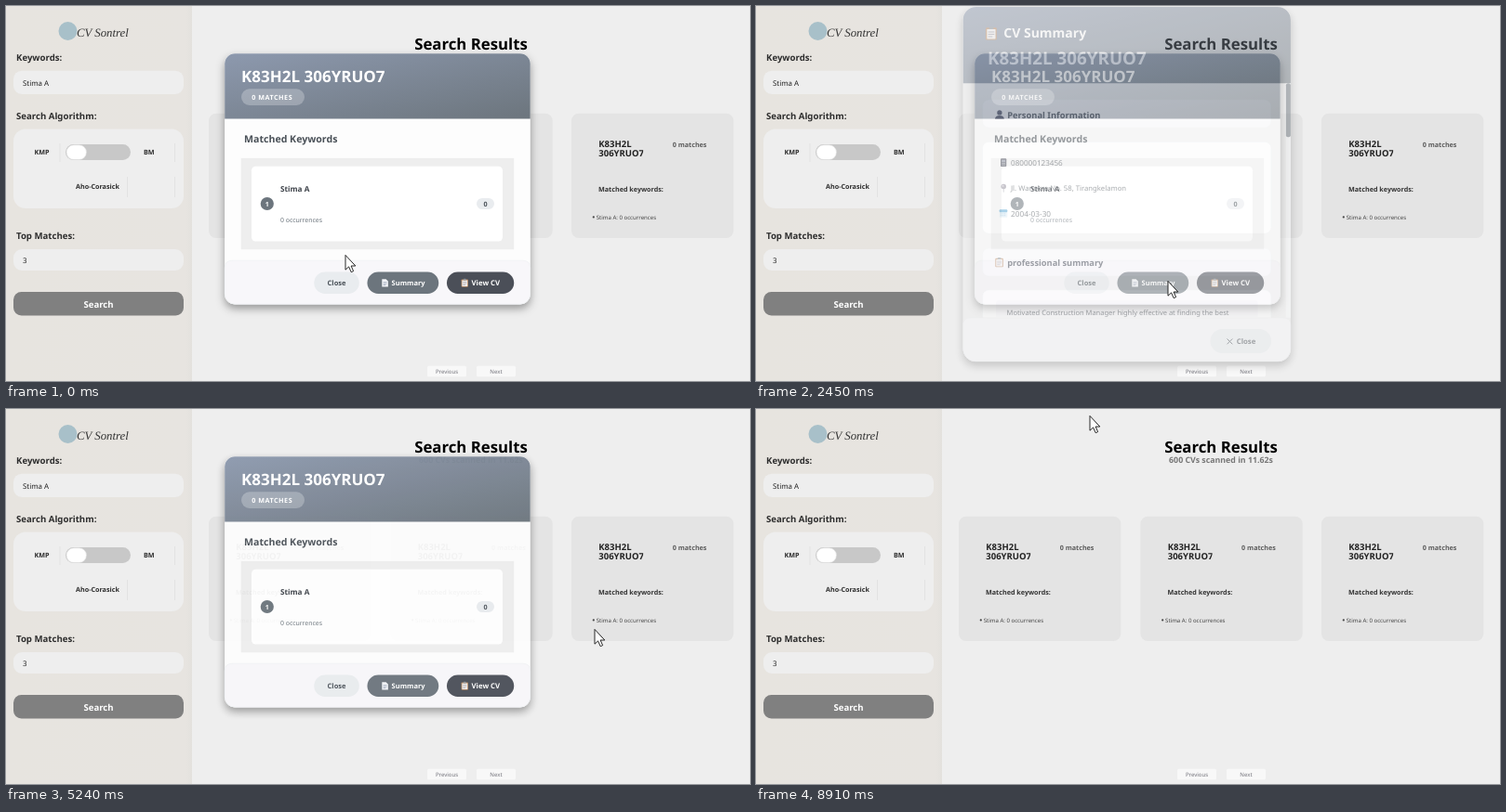
Recreate the animation shown at these times as an HTML page. Size 800 px wide and 404 px high, loop 8940 ms.

```html
<!DOCTYPE html>
<html lang="en">
<head>
<meta charset="utf-8">
<title>CV search</title>
<style>
  html, body { margin: 0; width: 100%; height: 100%; overflow: hidden; background: #eee; }
  svg { display: block; width: 800px; height: 404px; }
  text { font-family: "Noto Sans", "Open Sans", sans-serif; white-space: pre; text-rendering: geometricPrecision; }
</style>
</head>
<body>
<svg id="stage" viewBox="0 0 800 404" xmlns="http://www.w3.org/2000/svg"></svg>
<script>
const LOOP = 8940;
const NAME = ["K83H2L", "306YRUO7"];
const FULL_NAME = NAME.join(" ");
const CARD_X = [218, 413.4, 608];

const rect = (x, y, w, h, r, fill, extra = "") =>
  `<rect x="${x}" y="${y}" width="${w}" height="${h}" rx="${r}" fill="${fill}" ${extra}/>`;
const text = (x, y, size, fill, str, extra = "") =>
  `<text x="${x}" y="${y}" font-size="${size}" fill="${fill}" ${extra}>${str}</text>`;
const bold = (x, y, size, fill, str, extra = "") =>
  text(x, y, size, fill, str, `font-weight="700" ${extra}`);
const middle = 'text-anchor="middle"';
const path = (d, fill, extra = "") => `<path d="${d}" fill="${fill}" ${extra}/>`;
const at = (x, y, scale, content) =>
  `<g transform="translate(${x} ${y}) scale(${scale})">${content}</g>`;

// Icons on a grid of about 10 units
const clipboard =
  rect(0, 0.8, 9, 10, 1, "#b98a63") + rect(1, 2, 7, 8, 0.3, "#f4f0ee") +
  rect(2.7, 0, 3.6, 2, 0.6, "#8b9298") +
  path("M2 4.3H7M2 6.2H7M2 8.1H5.5", "none", 'stroke="#9a9aa5" stroke-width=".7"');
const page =
  path("M0 0H5.2L8 2.8V10H0Z", "#f3f5f8") +
  path("M1.6 4.2H6.3M1.6 6H6.3M1.6 7.8H5", "none", 'stroke="#8d99ae" stroke-width=".8"');
const person =
  `<circle cx="5" cy="3" r="2.7" fill="#3b3d55"/>` +
  path("M0 10Q0 6 5 6T10 10Z", "#3b3d55");
const phone =
  rect(0, 0, 6.4, 9, 1, "#3d4050") + rect(1.2, 1.4, 4, 2.6, 0.2, "#8d93a5") +
  path("M1.3 5.4H5.1M1.3 7H5.1", "none", 'stroke="#a9adba" stroke-width=".8"');
const pin =
  path("M3 4V9", "none", 'stroke="#a5a8b2" stroke-width=".9"') +
  `<circle cx="3" cy="2.8" r="2.8" fill="#8b8795"/><circle cx="2.3" cy="2" r=".9" fill="#d6d2da"/>`;
const calendar =
  rect(0, 0.5, 9, 9, 1, "#dcecf6") + rect(0, 0.5, 9, 3, 1, "#4a9fd0") +
  path("M1.6 5.3H7.5M1.6 7.3H7.5", "none", 'stroke="#7fb6d6" stroke-width=".9" stroke-dasharray="1.2 .8"');

function sidebar() {
  const ink = "#2d2d2d";
  const label = (y, str) => bold(11, y, 9.65, ink, str);
  return rect(0, 0, 200, 404, 0, "url(#side)") +
    `<circle cx="66.5" cy="27" r="10" fill="#a8c0c9"/>` +
    `<text x="76" y="33" font-size="12.8" font-style="italic" fill="#333" style="font-family:'Liberation Serif',serif">CV Sontrel</text>` +
    label(59.3, "Keywords:") + rect(8, 69.7, 183, 25.3, 9, "#eee") +
    text(18, 86, 7.9, "#222", "Stima A") +
    label(122.3, "Search Algorithm:") + rect(8, 132.5, 183, 85.5, 13, "#eee") +
    bold(30.5, 160, 7.2, ink, "KMP") + bold(148, 160, 7.2, ink, "BM") +
    bold(75, 196.7, 7.2, ink, "Aho-Corasick") +
    path("M58 148V168M181.5 148V168M130.5 184V206M181.5 184V206", "none", 'stroke="#e2e2e2"') +
    rect(64, 149, 70, 17, 8.5, "#c8c8c8") +
    rect(65, 149.7, 21.5, 15.8, 7.9, "#fff", 'stroke="#ddd" stroke-width=".6"') +
    label(251.2, "Top Matches:") + rect(8, 262, 183, 23, 9, "#eee") +
    text(18, 276.5, 7.9, "#222", "3") +
    rect(8, 308, 183, 25.6, 8.5, "#808080") +
    bold(99.5, 324.7, 9.6, "#fff", "Search", middle);
}

function card(x, i) {
  return `<g transform="translate(${x} 0)">` +
    rect(0, 115.7, 174.3, 134.3, 8, "#e4e4e4", `id="card${i}"`) +
    `<g clip-path="url(#nameClip)">` +
    bold(29.3, 151.7, 9.5, "#222", NAME[0]) + bold(29.3, 162.3, 9.5, "#222", NAME[1]) + "</g>" +
    bold(108.7, 151.6, 7.2, "#5c5c5c", "0 matches") +
    bold(29, 200.2, 7.2, "#333", "Matched keywords:") +
    `<circle cx="23.8" cy="227.4" r="1.1" fill="#444"/>` +
    text(26.7, 229.6, 6.07, "#444", "Stima A: 0 occurrences") + "</g>";
}

function results() {
  const pager = (x, str) => rect(x, 387.8, 42, 11.4, 1.5, "#f8f8f8") +
    text(x + 21, 395.8, 6.05, "#74747c", str, middle);
  return bold(500, 46.7, 16.8, "#000", "Search Results", middle) +
    bold(500, 58.3, 8.8, "#777", "600 CVs scanned in 11.62s", middle) +
    CARD_X.map(card).join("") + pager(453, "Previous") + pager(506, "Next");
}

// Rounded window: header gradient, body and footer
function shell(x, y, w, h, r, headH, footH, body) {
  const b = y + h, e = x + w;
  return rect(x, y, w, h, r, body, 'filter="url(#shadow)"') +
    path(`M${x} ${y + headH}V${y + r}a${r} ${r} 0 0 1 ${r} ${-r}H${e - r}a${r} ${r} 0 0 1 ${r} ${r}V${y + headH}Z`, "url(#head)") +
    path(`M${x} ${b - footH + 8}q0 -8 8 -8H${e - 8}q8 0 8 8V${b - r}a${r} ${r} 0 0 1 ${-r} ${r}H${x + r}a${r} ${r} 0 0 1 ${-r} ${-r}Z`,
      "#f8f7fa", 'stroke="#e9ecef" stroke-width=".5"');
}

function matchDialog() {
  const button = (x, w, fill, extra) => rect(x, 286.5, w, 23.5, 11.75, fill, extra);
  return shell(235.2, 51.2, 328.5, 270, 11, 70.3, 47, "#fdfdfd") +
    bold(253, 81.8, 17, "#fff", FULL_NAME) +
    rect(253, 89.3, 68, 17.6, 8.8, "#fff", 'fill-opacity=".25"') +
    bold(264.3, 101, 7.2, "#fff", "0 MATCHES", 'letter-spacing=".5"') +
    bold(256, 147, 10.6, "#495057", "Matched Keywords") +
    rect(252.7, 163.8, 293.5, 98.5, 0, "#eee") + rect(264, 172.7, 270, 80.8, 4.5, "#fff") +
    bold(295, 199.7, 8.2, "#3d4249", "Stima A") +
    text(295, 233.2, 6.9, "#6c757d", "0 occurrences") +
    `<circle cx="280.8" cy="213" r="7.1" fill="#6c757d"/>` +
    bold(280.8, 215.6, 7, "#fff", "1", middle) +
    rect(506, 207, 19, 12, 6, "#e9ecef") + bold(515.5, 215.7, 7.2, "#495057", "0", middle) +
    button(331.3, 48.5, "#e9ecef", 'id="closeMatch"') +
    bold(355.5, 301.4, 7.5, "#495057", "Close", middle) +
    button(388.5, 76.7, "#6c757d") + at(404.3, 294.2, 0.82, page) +
    bold(414.6, 301.4, 7.5, "#fff", "Summary") +
    button(474, 72.2, "#4b4f58") + at(489.6, 293.8, 0.82, clipboard) +
    bold(500.5, 301.4, 7.8, "#fff", "View CV");
}

function summaryDialog() {
  const ink = "#343a46";
  const panel = (y, h, fill) =>
    rect(243.6, y, 310.2, h, 6.5, fill, 'stroke="#e9ecef" stroke-width=".4"');
  const detail = (y, size, str) => text(274, y, size, "#495057", str);
  return shell(222.7, 1, 352.2, 382, 14, 82.3, 47, "#eee") +
    at(247, 22.3, 1.32, clipboard) + bold(266.3, 34.2, 14, "#fff", "CV Summary") +
    bold(249, 63.2, 18.8, "#f4f5f7", FULL_NAME) +
    rect(569.7, 83.3, 5.2, 252.5, 0, "#f8f9fa") + rect(569.9, 83.3, 5, 58, 2, "#6c757d") +
    panel(101, 30, "#f8f7fa") + at(257, 112, 0.98, person) +
    bold(270.2, 120.5, 9.35, ink, "Personal Information") +
    panel(146.6, 98.4, "#fff") +
    at(263, 164.3, 0.98, phone) + detail(171.5, 8.15, "080000123456") +
    at(263.3, 191.8, 0.98, pin) + detail(199.3, 7.7, "Jl. Wanokra No. 58, Tirangkelamon") +
    at(261.7, 218.8, 0.95, calendar) + detail(227, 8.25, "2004-03-30") +
    panel(261, 30, "#f8f7fa") + at(257.3, 271, 0.95, clipboard) +
    bold(270.2, 279.6, 9.25, ink, "professional summary") +
    `<g clip-path="url(#scrollClip)">` + panel(306, 60, "#fff") +
    rect(258, 317, 281.5, 40, 4, "#f8f7fa") +
    text(269.6, 332.8, 7.52, "#495057", "Motivated Construction Manager highly effective at finding the best") + "</g>" +
    rect(488.5, 348, 65.5, 26, 13, "#e9ecef", 'id="closeSummary"') +
    path("M506.5 358.5L512.3 364.3M512.3 358.5L506.5 364.3", "none", 'stroke="#495057" stroke-width="1"') +
    bold(516.7, 364.3, 7.8, "#495057", "Close");
}

const stage = document.getElementById("stage");
stage.innerHTML = `<defs>
  <linearGradient id="head" x1="0" y1="0" x2="1" y2="1">
    <stop stop-color="#8d99ae"/><stop offset="1" stop-color="#6c757d"/></linearGradient>
  <linearGradient id="side">
    <stop stop-color="#e7e4df"/><stop offset=".97" stop-color="#e7e4e0"/><stop offset="1" stop-color="#e3e1dd"/></linearGradient>
  <filter id="shadow" x="-10%" y="-10%" width="120%" height="125%">
    <feDropShadow dx="0" dy="4.5" stdDeviation="5" flood-opacity=".38"/></filter>
  <clipPath id="nameClip"><rect x="29" y="140" width="48.2" height="30"/></clipPath>
  <clipPath id="scrollClip"><rect x="222" y="83" width="347" height="252.6"/></clipPath>
</defs>` + rect(0, 0, 800, 404, 0, "#eee") + sidebar() + results() +
  `<g id="match">${matchDialog()}</g><g id="summary">${summaryDialog()}</g>` +
  path("M0 -.6V15.2L3.6 11.9 6.2 17.7 8.6 16.6 6.1 11H10.8Z", "#fff",
    'id="cursor" stroke="#111" stroke-width=".9" stroke-linejoin="round"');

const part = id => document.getElementById(id);
const match = part("match"), summary = part("summary"), cursor = part("cursor");
const closeMatch = part("closeMatch"), closeSummary = part("closeSummary");
const cards = CARD_X.map((_, i) => part("card" + i));

// Pointer stops: time, x, y
const stops = [
  [0, 365, 269], [200, 361, 299], [450, 361, 299], [1120, 446, 245], [1500, 446, 245],
  [2150, 443, 297], [2650, 443, 297], [3400, 512, 356], [3640, 512, 356],
  [4120, 361, 300], [4320, 361, 300], [4950, 633, 238], [5450, 633, 238],
  [6400, 361, 300], [6950, 361, 300], [7900, 359, 8], [LOOP, 359, 8]
];
const matchShown = [[-1000, 420], [1220, 4280], [5050, 6880]];
const summaryShown = [[2395, 3610]];

function pointer(t) {
  const i = stops.findIndex(s => s[0] > t);
  const [t0, x0, y0] = stops[i - 1], [t1, x1, y1] = stops[i];
  const p = (t - t0) / (t1 - t0), k = p * p * (3 - 2 * p);
  return [x0 + (x1 - x0) * k, y0 + (y1 - y0) * k];
}

// Windows fade in with a cubic ease and vanish at once
function opacity(spans, t) {
  const span = spans.find(([from, to]) => t >= from && t < to);
  return span ? 1 - (1 - Math.min(1, (t - span[0]) / 300)) ** 3 : 0;
}

function setOpacity(el, value) {
  el.setAttribute("opacity", value);
  el.setAttribute("display", value ? "inline" : "none");
}

function draw(t) {
  const [x, y] = pointer(t);
  const m = opacity(matchShown, t), s = opacity(summaryShown, t);
  const inside = (l, top, w, h) => x >= l && x <= l + w && y >= top && y <= top + h;
  setOpacity(match, m);
  setOpacity(summary, s);
  closeMatch.setAttribute("fill", !s && inside(331, 286, 49, 24) ? "#dee2e6" : "#e9ecef");
  closeSummary.setAttribute("fill", inside(488, 348, 66, 26) ? "#ced4da" : "#e9ecef");
  cards.forEach((el, i) =>
    el.setAttribute("fill", !m && inside(CARD_X[i], 116, 174, 134) ? "#dfdfdf" : "#e4e4e4"));
  cursor.setAttribute("transform", `translate(${x} ${y})`);
}

const start = performance.now();
function tick() {
  draw((performance.now() - start) % LOOP);
  requestAnimationFrame(tick);
}
tick();
</script>
</body>
</html>
```
